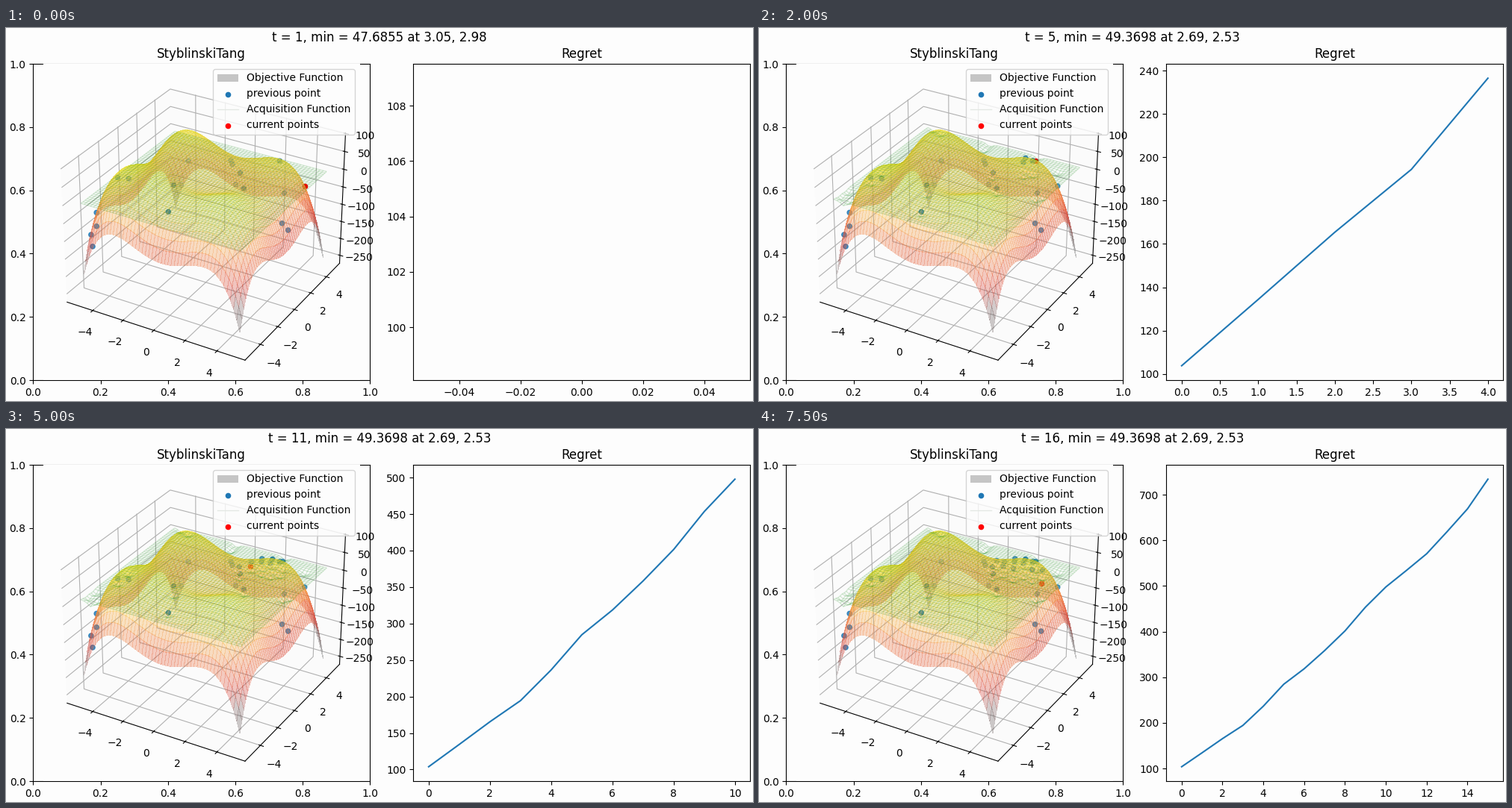
A matplotlib script for the animation above (8 s loop, 1000 px wide and 500 px high).

```python
import numpy as np
import matplotlib.pyplot as plt
from matplotlib.animation import FuncAnimation
from matplotlib.colors import LinearSegmentedColormap
from matplotlib.lines import Line2D
from matplotlib.patches import Patch

STEPS = 16
PAPER = "#fdfdfd"
plt.rcParams.update({
    "font.family": "DejaVu Sans",
    "figure.facecolor": PAPER,
    "axes.facecolor": PAPER,
})

# Start design, then one evaluated point per step
START = np.array([
    (-4.27, -2.40), (-4.35, -1.15), (-4.76, -3.88), (-4.25, -4.68),
    (-4.76, -4.50), (-4.36, -4.97), (-3.93, 4.73), (-0.88, -2.00),
    (-4.55, 4.94), (-0.07, -3.92), (-0.77, 4.23), (-0.75, 4.37),
    (1.28, 1.61), (-0.82, 4.93), (2.35, 0.10), (3.05, 2.98),
    (2.38, 4.94), (4.53, 0.56), (4.74, 0.90),
])
PICKS = np.array([
    (4.20, 3.88), (3.04, 2.99), (2.53, 3.09), (2.69, 2.53),
    (2.91, 3.61), (2.20, 3.67), (2.10, 2.59), (1.83, 3.16),
    (1.40, 2.69), (0.91, 2.18), (1.61, 2.18), (3.34, 2.38),
    (2.38, 1.97), (3.66, 2.99), (0.83, 2.85), (3.985, 2.30),
])
REGRET = [103.8, 134.4, 165.4, 194.4, 236.5, 284.6, 318.5, 358.3,
          401.5, 453.5, 497.8, 533.7, 570.6, 619.0, 669.0, 734.0]


def objective(x, y):
    return -0.5 * (x**4 - 16 * x**2 + 5 * x + y**4 - 16 * y**2 + 5 * y)


def kernel(a, b, scale=0.3):
    d2 = ((a[:, None, :] - b[None, :, :]) ** 2).sum(axis=2)
    return np.exp(-d2 / (2 * scale**2))


side = np.linspace(-5, 5, 50)
GX, GY = np.meshgrid(side, side)
GRID = np.column_stack([GX.ravel(), GY.ravel()])


def acquisition(seen, t):
    """Exploration bonus: weighted posterior deviation of the process."""
    k = kernel(GRID, seen)
    gain = np.linalg.inv(kernel(seen, seen) + 1e-3 * np.eye(len(seen)))
    var = 1 - np.einsum("ij,jk,ik->i", k, gain, k)
    weight = 10 * (np.log(t) / np.log(3)) ** 0.35 if t > 1 else 0
    return weight * np.sqrt(np.clip(var, 0, 1)).reshape(GX.shape)


def height_map():
    low, high = -250, 78.3
    stops = [(-250, "#464646"), (-190, "#785a5a"), (-140, "#d73c32"),
             (-70, "#f0783c"), (0, "#fac83c"), (78.3, "#e1e128")]
    return LinearSegmentedColormap.from_list(
        "height", [((z - low) / (high - low), c) for z, c in stops])


fig = plt.figure(figsize=(10, 5), dpi=100)
LEFT = [0.0363, 0.056, 0.451, 0.848]
frame_ax = fig.add_axes(LEFT)
frame_ax.set_title("StyblinskiTang")
blue_key = frame_ax.scatter([], [], s=20, color="C0")
red_key = frame_ax.scatter([], [], s=20, color="red")
frame_ax.set(xlim=(0, 1), ylim=(0, 1))

space = fig.add_axes(LEFT, projection="3d")
space.set(xlim=(-5.729, 5.729), ylim=(-5.729, 5.729), zlim=(-273.9, 102.2))
for axis in (space.xaxis, space.yaxis, space.zaxis):
    axis.set_pane_color((0.985, 0.985, 0.985, 0.5))
space.plot_surface(GX, GY, objective(GX, GY), cmap=height_map(), alpha=0.3,
                   linewidth=0, antialiased=False)
space.legend(
    [Patch(facecolor="#c5c5c5"), blue_key,
     Line2D([], [], color="#e4e8e4", lw=1), red_key],
    ["Objective Function", "previous point",
     "Acquisition Function", "current points"],
    loc="upper right")

regret_ax = fig.add_axes([0.5453, 0.056, 0.451, 0.848])
heading = fig.suptitle("", y=0.9917)
moving = []


def add_points(pts, color):
    return space.scatter(pts[:, 0], pts[:, 1], objective(*pts.T),
                         s=20, color=color)


def draw(i):
    while moving:
        moving.pop().remove()
    t = i + 1
    seen = np.vstack([START, PICKS[:i]])
    moving.append(add_points(seen, "C0"))
    moving.append(space.plot_wireframe(GX, GY, acquisition(seen, t),
                                       color="green", alpha=0.15, lw=1))
    moving.append(add_points(PICKS[i:t], "red"))

    best = "47.6855 at 3.05, 2.98" if t < 4 else "49.3698 at 2.69, 2.53"
    heading.set_text(f"t = {t}, min = {best}")

    regret_ax.clear()
    regret_ax.set_title("Regret")
    regret_ax.plot(range(t), REGRET[:t], color="C0")


anim = FuncAnimation(fig, draw, frames=STEPS, interval=500,
                     init_func=lambda: None, repeat=True, repeat_delay=0)
plt.show()
```
